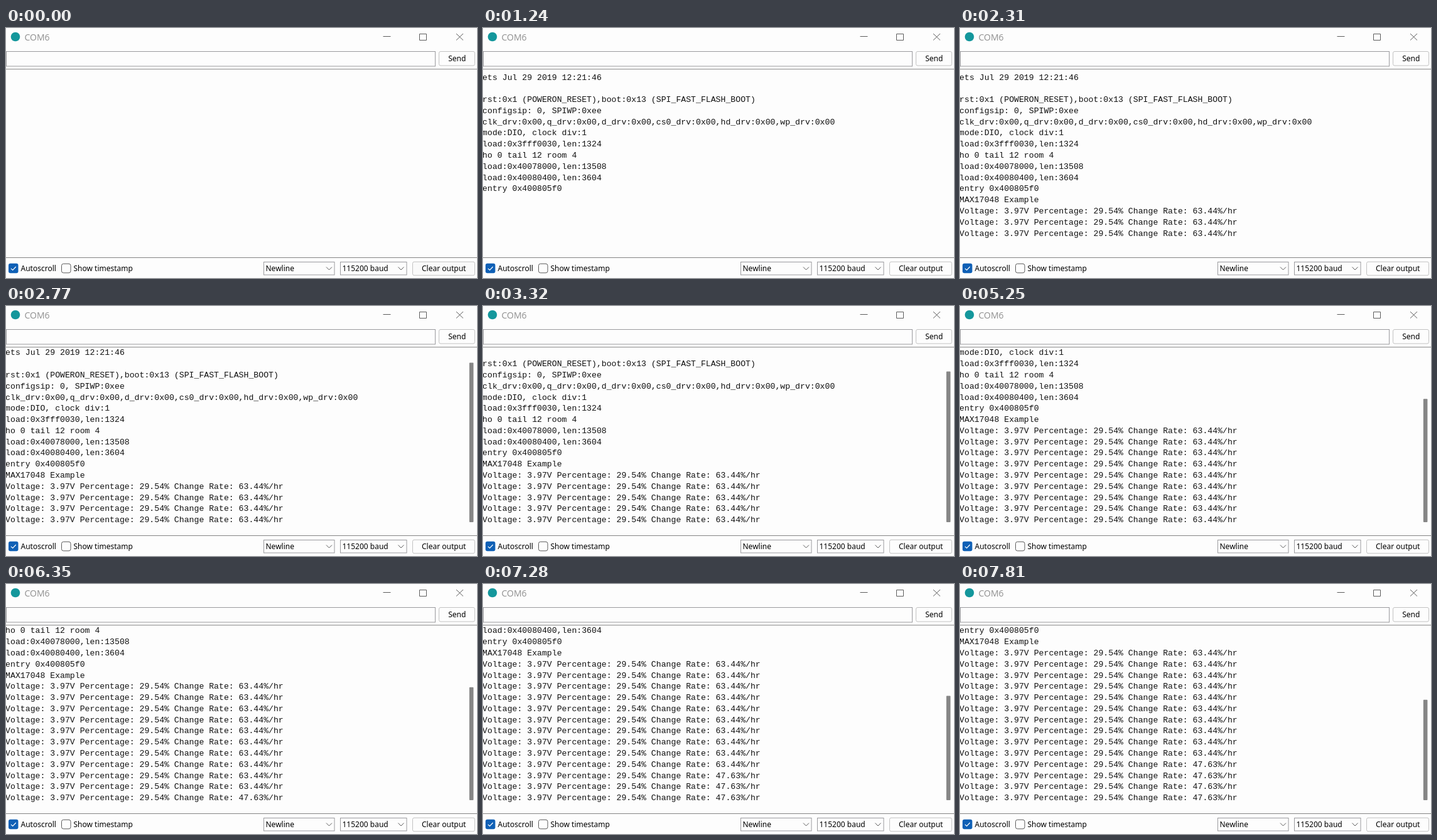
Write an HTML page that moves like this. It is 750x399 px and loops after 8000 ms.

```html
<!DOCTYPE html>
<html lang="en">
<head>
<meta charset="utf-8">
<title>Serial monitor</title>
<style>
html, body { margin: 0; height: 100%; overflow: hidden; background: #fdfdfd; }
svg { display: block; width: 750px; height: 399px; background: #fdfdfd; }
text { font: 12px "Noto Sans", "Open Sans", sans-serif; fill: #000; }
.title { font: 14px "Open Sans", "Noto Sans", sans-serif; fill: #909090; }
#log text { font: 13.18px "Liberation Mono", "Courier New", monospace; fill: #111; }
.line { fill: none; stroke: #5c5c5c; }
.field { fill: #fdfdfd; stroke: #9a9a9e; }
.button { fill: #fdfdfd; stroke: #c2c2c2; }
.rule { stroke: #858585; }
</style>
</head>
<body>
<svg viewBox="0 0 750 399">
  <circle cx="15" cy="14" r="7.3" fill="#14979c"/>
  <text class="title" x="29.5" y="19.5">COM6</text>
  <path class="line" d="M600.5 13.5H612.5M659 9.5H669.5V19.5H658.5V9.5ZM717 9L728 19.5M728 9L717 19.5"/>

  <rect class="field" x=".5" y="37.5" width="683" height="23.5"/>
  <rect class="button" x="689.5" y="37.5" width="57" height="22.5" rx="2.5"/>
  <text x="704.2" y="53.2">Send</text>
  <path class="rule" d="M0 65.7H750M0 366.5H750"/>

  <g id="log"></g>
  <rect id="thumb" x="737.8" width="6.6" rx="1" fill="#868686"/>

  <rect x="4" y="375.8" width="15.5" height="15.5" rx="3" fill="#0f60b6"/>
  <path d="M8 383.8L10.7 386.5L15.8 381" fill="none" stroke="#fff" stroke-width="1.2"/>
  <text x="23.5" y="388.2">Autoscroll</text>
  <rect class="line" x="88.5" y="376.3" width="14.5" height="14.5" rx="3"/>
  <text x="107.5" y="388.2">Show timestamp</text>

  <rect class="field" x="410.5" y="373.5" width="112.5" height="20.5"/>
  <rect class="field" x="532.5" y="373.5" width="105.5" height="20.5"/>
  <path class="line" d="M510 381.5L514.5 386L519 381.5M624.5 381.5L629 386L633.5 381.5"/>
  <text x="413.5" y="388.2">Newline</text>
  <text x="535.5" y="388.2">115200 baud</text>
  <rect class="button" id="clear" x="647.5" y="373.2" width="99" height="21.6" rx="2.5"/>
  <text x="662" y="388.2">Clear output</text>
</svg>
<script>
const LOOP = 8000, PITCH = 17.79, FIRST = 82.5, LAST = 345.2, BAR_END = 345;
const boot = `ets Jul 29 2019 12:21:46

rst:0x1 (POWERON_RESET),boot:0x13 (SPI_FAST_FLASH_BOOT)
configsip: 0, SPIWP:0xee
clk_drv:0x00,q_drv:0x00,d_drv:0x00,cs0_drv:0x00,hd_drv:0x00,wp_drv:0x00
mode:DIO, clock div:1
load:0x3fff0030,len:1324
ho 0 tail 12 room 4
load:0x40078000,len:13508
load:0x40080400,len:3604
entry 0x400805f0
MAX17048 Example`.split("\n");
const readings = [1320, 1780, 2310, 2770, 3320, 3780, 4340, 4800, 5250, 5800, 6350, 6730, 7280, 7810];
const reading = i => `Voltage: 3.97V Percentage: 29.54% Change Rate: ${i < 10 ? "63.44" : "47.63"}%/hr`;
const lines = boot.concat(readings.map((_, i) => reading(i)));

const $ = id => document.getElementById(id);
const rows = lines.map(line => {
  const row = document.createElementNS("http://www.w3.org/2000/svg", "text");
  row.setAttribute("x", -0.9);
  row.textContent = line;
  return $("log").appendChild(row);
});

function lineCount(t) {
  if (t < 1240) return 0;
  if (t < readings[0]) return boot.length - 1;
  return boot.length + readings.filter(at => t >= at).length;
}

function draw(t) {
  const count = lineCount(t);
  const scroll = Math.max(0, FIRST + (count - 1) * PITCH - LAST);
  rows.forEach((row, i) => {
    const y = FIRST + i * PITCH - scroll;
    row.setAttribute("y", y);
    row.style.display = i < count && y > 70 ? "" : "none";
  });
  const size = scroll ? 4327 / (count + 1) : 0;
  $("thumb").setAttribute("y", BAR_END - size);
  $("thumb").setAttribute("height", size);
  $("clear").style.fill = t < 70 ? "#fafafa" : "";
}

const start = performance.now();
function tick() {
  draw((performance.now() - start) % LOOP);
  requestAnimationFrame(tick);
}
tick();
</script>
</body>
</html>
```
